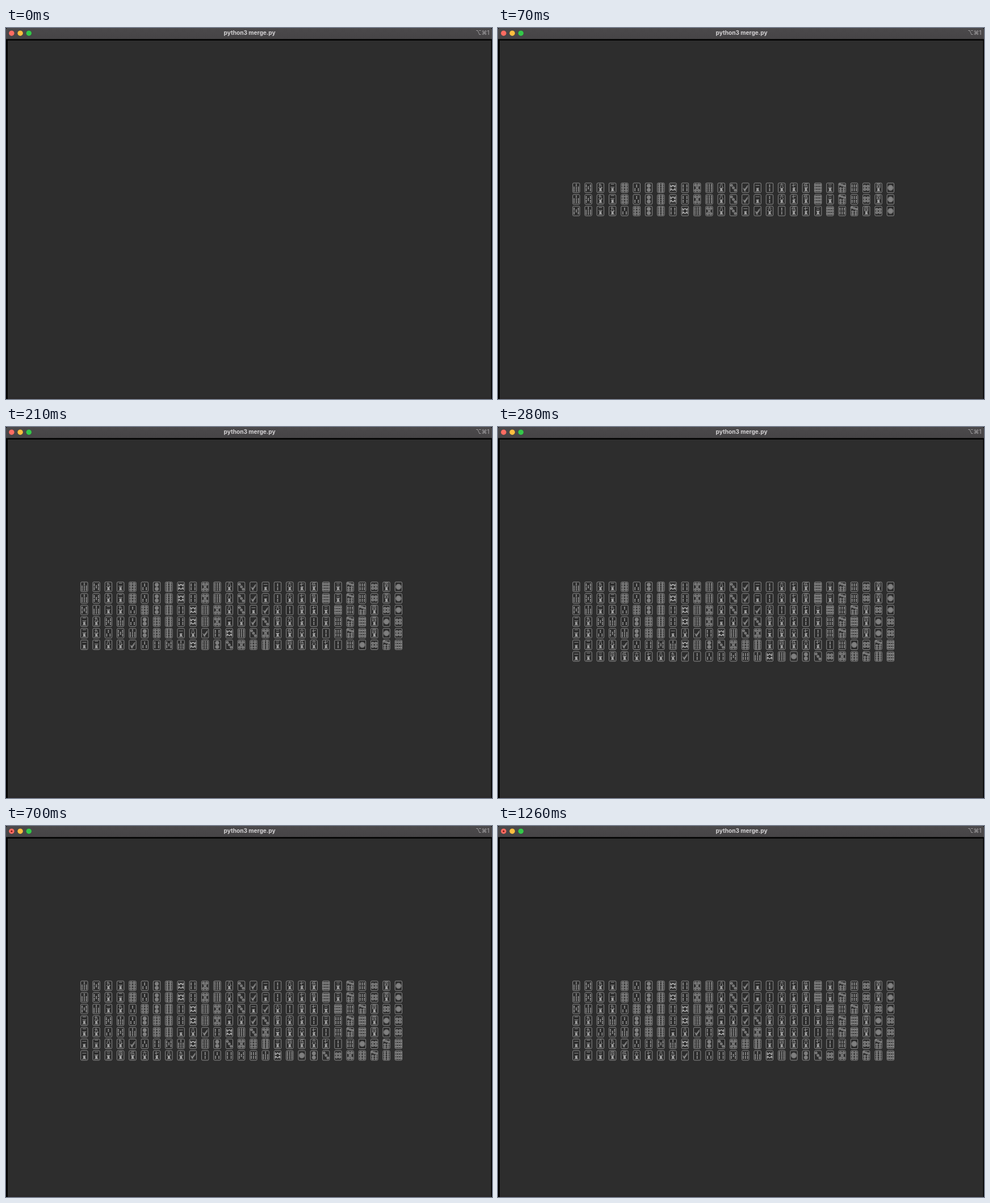
Write an HTML page that moves like this. It is 856x654 px and loops after 1.33 s.

```html
<!DOCTYPE html>
<html lang="en">
<head>
<meta charset="utf-8">
<title>python3 merge.py</title>
<style>
  html, body { margin: 0; width: 100%; height: 100%; overflow: hidden; background: #000; }
  svg { display: block; width: 856px; height: 654px; }
  .title { font: 700 10.1px Inter, "Liberation Sans", sans-serif; fill: #d2d0d2; text-anchor: middle; }
  .keys { font: 500 10px Inter, "DejaVu Sans", sans-serif; fill: #a09ea0; text-anchor: end; }
  .han { font: 500 7.8px "Noto Sans CJK TC", "Noto Sans CJK SC", "Noto Sans CJK JP", "Noto Sans CJK", sans-serif;
         fill: #bdbdbd; text-anchor: middle; }
  .light { stroke: #000; stroke-opacity: .2; stroke-width: .5; }
  .edge { fill: none; stroke: #9c9c9c; stroke-width: .85; }
  .stick { fill: none; stroke: #b0b0b0; stroke-width: 1.5; }
  .node { fill: #2d2d2d; }
  .dot { fill: #707070; stroke: #a0a0a0; stroke-width: .65; }
  .fine { fill: none; stroke: #ababab; stroke-width: .7; }
  .brush { fill: none; stroke: #bdbdbd; stroke-width: .8; }
</style>
</head>
<body>
<svg viewBox="0 0 856 654" xmlns="http://www.w3.org/2000/svg">
  <defs>
    <linearGradient id="bar" x2="0" y2="1">
      <stop stop-color="#4b494b"/><stop offset="1" stop-color="#464446"/>
    </linearGradient>
    <g id="tiles"></g>
  </defs>
  <rect width="856" height="654"/>
  <path d="M0 19.6V3Q0 0 3 0H853Q856 0 856 3V19.6Z" fill="url(#bar)"/>
  <rect x="3" y="22" width="851.5" height="632" fill="#2d2d2d"/>
  <rect x="3" y="651.5" width="851.5" height="2.5" fill="#2b292a"/>
  <circle class="light" cx="9.9" cy="9.2" r="4.8" fill="#fe6c62"/>
  <circle class="light" cx="25.1" cy="9.2" r="4.8" fill="#fdbe40"/>
  <circle class="light" cx="40.3" cy="9.2" r="4.8" fill="#34c84a"/>
  <circle id="mark" cx="9.9" cy="9.2" r="1.5" fill="#80160f" opacity="0"/>
  <text class="title" x="429" y="12.2">python3 merge.py</text>
  <text class="keys" x="851.5" y="11.8">⌥⌘1</text>
  <g id="rows"></g>
</svg>
<script>
const LOOP = 1330;
const ROW_START = [70, 70, 70, 140, 140, 210, 280];
const LEFT = 137.8, TOP = 281.7, STEP_X = 21.29, STEP_Y = 20.46;
const NUMERALS = "一二三四伍六七八九";
// m: characters, s: bamboo, p: circles
const SHUFFLED = "s7 s5 m9 m2 p6 s3 p2 p8 s8 s4 p5 s9 m8 p3 s1 m1 s2 m6 m7 m5 p9 m3 p7 s6 p4 m4 p1".split(" ");

const byId = id => document.getElementById(id);
const grid = (xs, ys) => ys.flatMap(y => xs.map(x => [x, y]));
const dots = (points, r) => points.map(([x, y]) =>
  `<circle class="dot" cx="${x}" cy="${y}" r="${r}"/>`).join("");
const sticks = (points, half = 2.5) => points.map(([x, y]) =>
  `<path class="stick" d="M${x} ${y - half}v${half * 2}"/>` +
  `<rect class="node" x="${x - .8}" y="${y - .3}" width="1.6" height=".6"/>`).join("");

// Brush-style 萬 with a narrow head and spreading legs.
const myriad = `<path class="brush" d="M-2.4 1.1L2.5 .7M-.9 .2V1.8M1 0V1.6M-1.4 2.2H1.5V4.1H-1.2ZM-1.3 3.1H1.4M0 2.2V5.4
  M-1 4.3L-3.2 7.2M-1.8 5.3L2.2 4.9L3.1 7.3M-1 6.4L1.3 6"/>`;
const character = rank => `<text class="han" y="-.7">${NUMERALS[rank - 1]}</text>${myriad}`;

const bird = `<path class="fine" d="M-4.6 .6L-2.4 1.8L-1 4.5L4.6 -5M-3.6 3.2L-1 4.5L4.7 -2.2M-2.4 1.8L-.2 1.2L3.2 -3.6M-2.6 5.8H.8"/>
  <path d="M-3.4 1.2L-1 3.4L1.4 .2L.2 3.6L-1.2 5Z" fill="#a8a8a8"/>`;
const zigzag = `<path class="stick" stroke-linejoin="bevel" d="M-4 -5.4V-1L0 -4.6L4 -1V-5.4M-4 5.4V1L0 4.6L4 1V5.4"/>`;

function bamboo(rank) {
  const pair = [-3.3, 3.3], trio = [-3.8, 0, 3.8], halves = [-3.3, 3.3];
  switch (rank) {
    case 1: return bird;
    case 2: return sticks(grid([0], halves));
    case 3: return sticks([[0, -3.3], [-3, 3.3], [3, 3.3]]);
    case 4: return sticks(grid(pair, halves));
    case 5: return sticks([...grid([-3.7, 3.7], halves), [0, 0]]);
    case 6: return sticks(grid(trio, halves));
    case 7: return sticks([[0, -5], ...grid(trio, [0, 4.7])], 2);
    case 8: return zigzag;
    case 9: return sticks(grid(trio, [-4.8, 0, 4.8]), 2.1);
  }
}

function circles(rank) {
  const pair = [-2.7, 2.7];
  switch (rank) {
    case 1: return dots([[0, 0]], 4.6) + dots([[0, 0]], 2.6) + dots([[0, 0]], .8);
    case 2: return dots(grid([0], [-3.6, 3.6]), 3.1) + dots(grid([0], [-3.6, 3.6]), 1.4);
    case 3: return dots([[-3.2, -4.4], [0, 0], [3.2, 4.4]], 2);
    case 4: return dots(grid(pair, pair), 2.3);
    case 5: return dots([...grid(pair, [-4.7, 4.7]), [0, 0]], 2.2);
    case 6: return dots(grid(pair, [-5, 0, 5]), 2.1);
    case 7: return dots([[-3.8, -6], [0, -4.7], [3.8, -3.4], ...grid(pair, [1.2, 5.5])], 1.8);
    case 8: return dots(grid(pair, [-5.8, -1.95, 1.95, 5.8]), 1.7);
    case 9: return dots(grid([-3.8, 0, 3.8], [-4.9, 0, 4.9]), 1.8);
  }
}

const faces = { m: character, s: bamboo, p: circles };
const order = tile => "msp".indexOf(tile[0]) * 9 + +tile[1];

byId("tiles").innerHTML = SHUFFLED.map(tile =>
  `<g id="${tile}"><rect class="edge" x="-6.2" y="-8.5" width="12.4" height="17" rx="1.8"/>${faces[tile[0]](+tile[1])}</g>`).join("");

// Each merge pass leaves runs of the given width in order.
function mergePass(width) {
  const result = [];
  for (let i = 0; i < SHUFFLED.length; i += width)
    result.push(...SHUFFLED.slice(i, i + width).sort((a, b) => order(a) - order(b)));
  return result;
}

byId("rows").innerHTML = ROW_START.map((_, row) => {
  const tiles = mergePass(row ? 2 ** (row - 1) : 1);
  return `<g>${tiles.map((tile, i) =>
    `<use href="#${tile}" x="${(LEFT + i * STEP_X).toFixed(2)}" y="${(TOP + row * STEP_Y).toFixed(2)}"/>`).join("")}</g>`;
}).join("");

const rows = [...byId("rows").children], mark = byId("mark");

function draw(t) {
  rows.forEach((row, i) => row.setAttribute("visibility", t >= ROW_START[i] ? "visible" : "hidden"));
  mark.setAttribute("opacity", t < 490 ? 0 : t < 560 ? .5 : 1);
}

const start = performance.now();
function tick() {
  draw((performance.now() - start) % LOOP);
  requestAnimationFrame(tick);
}
draw(0);
requestAnimationFrame(tick);
</script>
</body>
</html>
```
